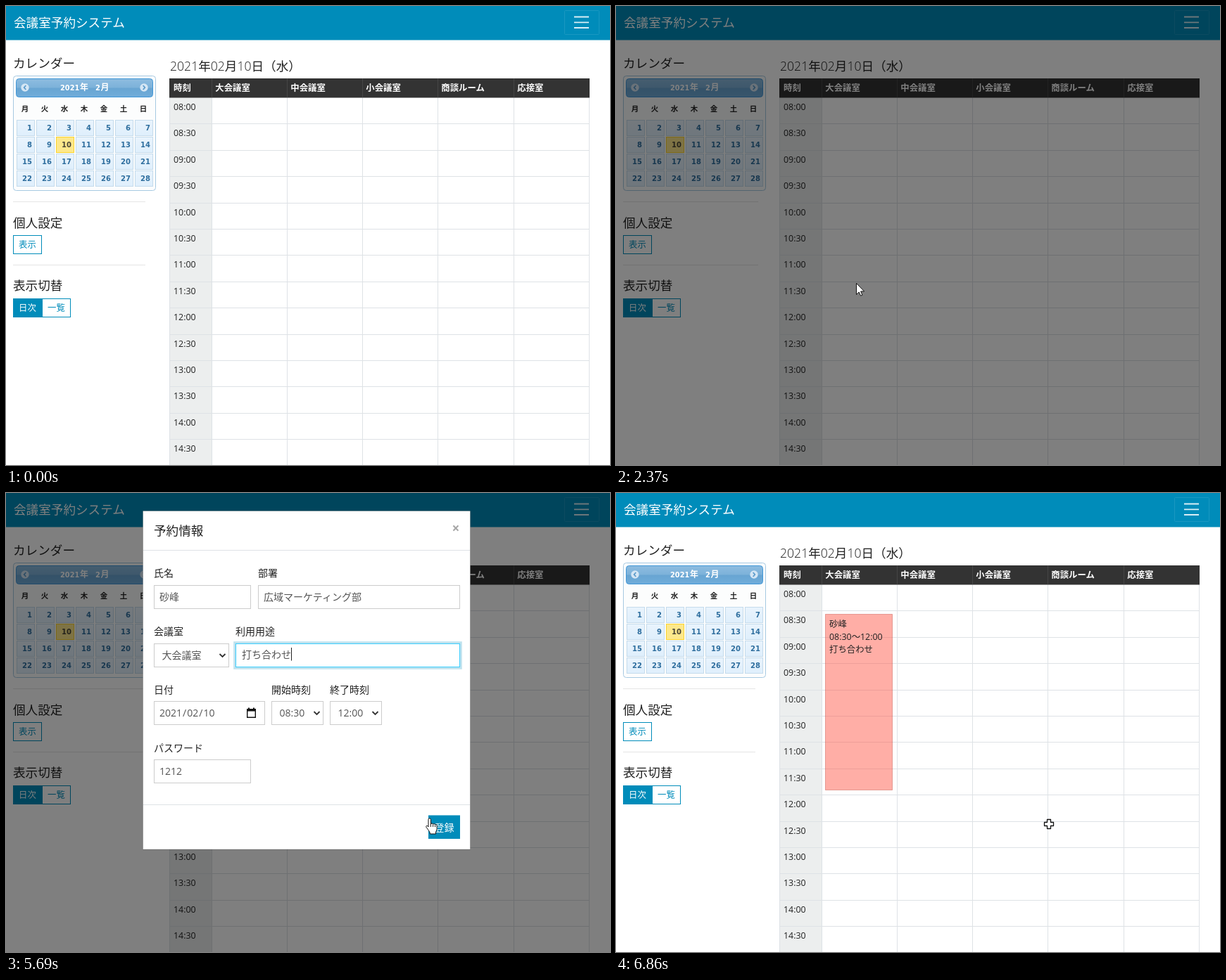
Animation, 858 px wide and 653 px high, one loop 7640 ms. Source, as an HTML page:

```html
<!DOCTYPE html>
<html lang="ja">
<head>
<meta charset="utf-8">
<title>会議室予約システム</title>
<style>
html, body { margin: 0; width: 100%; height: 100%; overflow: hidden; background: #fff; }
svg { display: block; width: 100%; height: 100%; }
text { font-family: "Open Sans", "Noto Sans CJK JP", "Noto Sans CJK", sans-serif; white-space: pre; }
.head { font-weight: 350; }
.date { font-weight: 300; }
.bold { font-weight: 700; }
.cal { font-family: "DejaVu Sans", "Noto Sans CJK JP", sans-serif; font-weight: 700; }
.mid { text-anchor: middle; }
.end { text-anchor: end; }
.ime { font-family: "Noto Sans CJK JP", "Noto Sans CJK", sans-serif; font-feature-settings: "palt"; }
</style>
</head>
<body>
<svg id="stage" viewBox="0 0 858 653" preserveAspectRatio="none"></svg>
<script>
const LOOP = 7640, BLUE = '#008cba', LINE = '#dee2e6';
const NAME = '砂峰', DEPT = '広域マーケティング部';
const $ = id => document.getElementById(id);
const clamp = v => Math.max(0, Math.min(1, v));
const range = n => [...Array(n).keys()];
const easeOut = p => 1 - (1 - p) ** 2;

// cy is the vertical middle of the glyphs
const text = (x, cy, s, size = 14, fill = '#222', cls = '', more = '') =>
  `<text x="${x}" y="${(cy + size * .37).toFixed(2)}" font-size="${size}" fill="${fill}" class="${cls}" ${more}>${s}</text>`;
const rect = (x, y, w, h, fill, more = '') =>
  `<rect x="${x}" y="${y}" width="${w}" height="${h}" fill="${fill}" ${more}/>`;
const frame = (x, y, x2, y2, stroke, fill = '#fff', more = '') =>
  rect(x + .5, y + .5, x2 - x - 1, y2 - y - 1, fill, `stroke="${stroke}" ${more}`);
const path = (d, stroke, width = 1, more = '') =>
  `<path d="${d}" fill="none" stroke="${stroke}" stroke-width="${width}" ${more}/>`;
const rowY = k => Math.round(130 + 37.4 * k);

function header() {
  return rect(0, 0, 858, 48.5, BLUE) + text(11, 23, '会議室予約システム', 17.6, '#fff')
    + frame(793, 6, 843, 41, '#1a98c1', 'none', 'rx="1"')
    + path('M807 15.5h21M807 23.300h21M807 31h21', '#d9eef5', 1.8);
}

function calendar() {
  const arrow = (x, d) => `<circle cx="${x}" cy="116" r="5.700" fill="#d5e6f4"/>`
    + path(`M${x - d} 113l${2 * d} 3l${-2 * d} 3`, '#5c9ccc', 1.8);
  const week = [...'月火水木金土日'].map((d, i) => text(27 + 28 * i, 146, d, 10.5, '#222', 'cal mid')).join('');
  const days = range(28).map(i => {
    const x = 15 + 28 * (i % 7), y = 162 + Math.round(24.1 * Math.floor(i / 7)), today = i === 9;
    return frame(x, y, x + 26, y + 23, today ? '#fad42e' : '#c5dbec', today ? '#fde88c' : 'url(#day)')
      + text(x + 22, y + 11, i + 1, 10, today ? '#4a4636' : '#2e6e9e', 'cal end');
  }).join('');
  return frame(10, 99, 213, 263, '#a6c9e2', '#fcfdfd', 'rx="4"')
    + frame(14, 103, 209, 130, '#4297d7', 'url(#bar)', 'rx="4"')
    + arrow(27, -1.3) + arrow(196, 1.3)
    + text(77, 116, '2021', 9.8, '#fff', 'cal') + text(105, 116, '年', 12, '#fff', 'cal')
    + text(127, 116, '2', 9.8, '#fff', 'cal') + text(134.5, 116, '月', 12, '#fff', 'cal') + week + days;
}

function sidebar() {
  return text(10, 81, 'カレンダー', 17.6, '#222', 'head') + calendar()
    + path('M10 278.500H198M10 368.500H198', '#e5e5e5', 1, 'id="rules"')
    + text(10, 308, '個人設定', 17.6, '#222', 'head')
    + frame(10, 326, 51, 353, BLUE) + text(18, 339.5, '表示', 12.4, BLUE)
    + text(10, 397.5, '表示切替', 17.6, '#222', 'head')
    + frame(10, 416, 51, 443, BLUE, BLUE) + text(18, 429.5, '日次', 12.4, '#fff')
    + frame(51, 416, 92, 443, BLUE) + text(59, 429.5, '一覧', 12.4, BLUE);
}

function table() {
  const cols = [232, 292, 399, 506, 613, 721, 828];
  const heads = ['時刻', '大会議室', '中会議室', '小会議室', '商談ルーム', '応接室'];
  const two = n => String(n).padStart(2, '0');
  return text(233, 85, '2021年02月10日（水）', 17.6, '#222', 'date')
    + rect(232, 130, 60, 523, '#eceeee') + rect(293, 168, 106, 0, '#ffee99', 'id="pick"')
    + path(cols.map(x => `M${x + .5} 130V653`).join('') + range(13).map(k => `M232 ${rowY(k + 1) + .5}H829`).join(''), LINE)
    + rect(232, 103, 597, 27.5, '#333')
    + path(cols.slice(1, 6).map(x => `M${x + .5} 103V130`).join(''), '#454545')
    + heads.map((s, i) => text(cols[i] + (i ? 5.3 : 6), 116, s, 12.4, '#fff', 'bold')).join('')
    + range(14).map(k => text(238, 143.5 + 37.4 * k, `${two(8 + (k >> 1))}:${k % 2 ? '30' : '00'}`, 12.4)).join('')
    + '<g id="booking">' + frame(297, 172, 393, 423, 'rgba(190,60,50,.4)', 'rgba(255,94,78,.5)')
    + text(303, 186.5, NAME, 12.4) + text(303, 204, '08:30～12:00', 12.4) + text(303, 222, '打ち合わせ', 12.4) + '</g>';
}

function modal() {
  const box = (x, y, x2, s, pad = 8, more = '') =>
    frame(x, y, x2, y + 34, '#ccc') + text(x + pad, y + 17, s, 14, '#555', '', more);
  const select = (x, y, x2, s) => box(x, y, x2, s, 11.5) + path(`M${x2 - 13.5} ${y + 15}l4 4l4-4`, '#333', 1.8);
  const labels = [[210, 114, '氏名'], [358, 114, '部署'], [210, 197, '会議室'], [326, 197, '利用用途'],
    [210, 280, '日付'], [377, 280, '開始時刻'], [460, 280, '終了時刻'], [210, 363, 'パスワード']];
  return frame(194, 25, 660, 507.5, 'rgba(0,0,0,.2)')
    + path('M195 81.500H659M195 443.500H659', LINE)
    + text(210, 53, '予約情報', 17.6, '#222', 'head') + text(639, 50, '×', 19, '#a6a6a6', 'bold mid')
    + labels.map(l => text(...l)).join('')
    + box(210, 131, 348, NAME) + box(358, 131, 645, DEPT) + select(210, 214, 317, '大会議室')
    + rect(324.6, 212.6, 321.8, 36.8, 'none', 'id="ring" stroke="rgba(0,140,186,.25)" stroke-width="2.800"')
    + frame(326, 214, 645, 248, '#ccc', '#fff', 'id="field"')
    + text(335, 230, '', 14, '#555', '', 'id="entry"')
    + path('M405.500 220V238.500', '#222', 1, 'id="caret"') + '<g id="mark"></g>'
    + box(210, 296, 368, '2021/02/10', 8, 'dx="0 0 0 0 1 1 0 1 1"')
    + path('M342.700 308.500h11.600v10.800h-11.600z', '#111', 1.4) + rect(342, 307, 13, 3.5, '#111')
    + rect(344, 305.5, 2, 2, '#111') + rect(351, 305.5, 2, 2, '#111')
    + select(377, 296, 451, '08:30') + select(460, 296, 534, '12:00') + box(210, 379, 348, '1212')
    + rect(598.2, 457.2, 48.6, 36.6, 'none', 'id="glow" stroke="rgba(0,140,186,.5)" stroke-width="3.500"')
    + rect(600, 458.5, 45, 33.5, BLUE, 'id="submit"') + text(622.5, 476, '登録', 14, '#fff', 'mid');
}

function pointers() {
  const shape = (id, d, more = '') => `<path id="${id}" d="${d}" fill="#fff" stroke="#111" stroke-linejoin="round" ${more}/>`;
  return '<g id="pointer"><circle id="halo" r="11" fill="#f8ec22" opacity=".92"/>'
    + shape('cross', 'M-2.500-6.500h5v4h4v5h-4v4h-5v-4h-4v-5h4z', 'stroke-width="1.300"')
    + shape('arrow', 'M.5.5V16.500L4.200 13 6.600 18.200 8.900 17.200 6.600 12h5z')
    + shape('beam', 'M-3-7.500h2.200l.8.800.8-.8H3M0-7V7M-3 7.500h2.200L0 6.700l.8.800H3', 'style="fill:none"')
    + shape('hand', 'M4 2.500a1.700 1.700 0 0 1 3.400 0V9c.3-1.400 3-1.300 3.200.3.5-1.100 2.700-.9 2.900.6.5-.9 2.600-.6 2.600 1.200V16c0 2-1.600 3-1.600 5v2H6.300v-1.500C5.500 19 2.300 15.500.9 13.200.2 11.800 2 10.600 3 11.800L4 13zM7.400 9v4M10.600 9.500v3.500M13.500 10.500v2.500', 'transform="translate(-6 -1)"')
    + '</g>';
}

const fade = (id, stops) => `<linearGradient id="${id}" x2="0" y2="1">`
  + stops.map(([o, c]) => `<stop offset="${o}" stop-color="${c}"/>`).join('') + '</linearGradient>';

$('stage').innerHTML = '<defs>' + fade('bar', [[0, '#8dbce0'], [.48, '#7db2da'], [.52, '#68a5d2'], [1, '#70acda']])
  + fade('day', [[0, '#e9f4fd'], [.5, '#e4f1fc'], [1, '#dfeffc']]) + '</defs>'
  + rect(0, 0, 858, 653, '#fff') + header() + sidebar() + table()
  + rect(0, 0, 858, 653, '#000', 'id="shade"')
  + `<g id="modal">${modal()}</g><g id="popup"></g>` + pointers();

// screen updates: first time, last time, count
const runs = [[0, 0, 1], [220, 580, 6], [750, 1040, 5], [1210, 1580, 6], [1660, 1890, 4], [2190, 2370, 3],
  [2430, 2830, 6], [3160, 3220, 2], [3370, 3520, 3], [3690, 4080, 6], [4220, 4300, 2], [4530, 4530, 1],
  [5000, 5000, 1], [5140, 5690, 8], [5770, 5840, 2], [6010, 6010, 1], [6160, 6330, 3], [6480, 6710, 4], [6800, 6860, 2]];
const last = (list, t) => list.filter(r => t >= r[0]).pop();
function snap(t) {
  const [a, b, n] = last(runs, t), d = (b - a) / (n - 1) || 1;
  return a + d * Math.min(n - 1, Math.floor((t - a) / d + 1e-6));
}

const route = [[220, 664, 561], [364, 470, 370], [508, 349, 256], [580, 354, 252], [750, 354, 252], [1040, 357, 201],
  [1210, 357, 201], [1580, 339, 359], [1890, 341, 394], [3080, 341, 394], [3160, 343, 396], [5060, 343, 396],
  [5690, 602, 463], [5840, 613, 470], [6080, 613, 470], [6160, 615, 471], [LOOP, 615, 471]];
function place(t) {
  const i = Math.max(1, route.findIndex(k => k[0] >= t)), [a, x, y] = route[i - 1], [b, u, v] = route[i];
  const p = clamp((t - a) / (b - a));
  return [x + (u - x) * p, y + (v - y) * p];
}

const guesses = [
  ['打ち合わせ', 'うれしい', 'ウェブ', '売上', '打ち合わせを'],
  ['打ち合わせ', 'うち', '内', '打合せ', '打ち合わせのため'],
  ['打ち合わせ', '打合せ', '打ち合わせを', '打ち上げ', '打ち合わせの件'],
  ['打ち合わせ', '打合せ', '打ち合わせ結果', '打ち合わせを', '打ち合わせのため']];
const typing = [[0, ''], [3160, 'う'], [3220, 'う', 0], [3370, 'うｔ', 0], [3445, 'うち', 0], [3520, 'うち', 1],
  [3690, 'うちあ', 1], [3768, 'うちあ', 2], [3846, 'うちあｗ', 2], [3924, 'うちあわ', 2], [4002, 'うちあわ', 3],
  [4080, 'うちあわｓ', 3], [4220, 'うちあわせ', 3], [4300, '打ち合わせ']];
const popup = list => list === undefined ? ''
  : frame(304, 239, list ? 487.5 : 479.5, 391, '#c6c6c6')
    + guesses[list].map((s, i) => text(337, 254.5 + 30 * i, s, 13.6, '#000', 'ime')).join('');

function underline(t, width) {
  if (t < 3160 || t >= 4530 || !width) return '';
  if (t >= 4300) return rect(335, 236, width - 1, 2, '#444');
  return path(`M335 236.500h${width}`, '#333', 1, 'stroke-dasharray="2 2"')
    + path(`M337 237.500h${width - 2}`, '#333', 1, 'stroke-dasharray="2 2"');
}

const show = (id, on) => { $(id).style.display = on ? '' : 'none'; };

function draw(t) {
  const open = t >= 2190 && t < 6860, closing = t >= 6400;
  $('rules').setAttribute('d', `M10 278.500H${open ? 202 : 198}M10 368.500H${open ? 202 : 198}`);

  const [x, y] = place(t), dragging = t >= 1210 && t < 2190;
  const end = rowY(Math.floor((y - 130) / 37.4) + 1);
  $('pick').setAttribute('height', dragging ? end - 168 : 0);
  show('booking', t >= 6550);

  const dim = closing ? (6842 - t) / 150 : (t - 2160) / 150;
  $('shade').setAttribute('opacity', .5 * clamp(dim));
  const alpha = clamp(closing ? (6590 - t) / 150 : (t - 2400) / 150);
  const slide = closing ? easeOut(clamp((t - 6440) / 300)) : 1 - easeOut(clamp((t - 2400) / 300));
  $('modal').setAttribute('opacity', alpha);
  $('modal').setAttribute('transform', `translate(0 ${-44 * slide})`);
  show('modal', alpha > 0);

  const [, word, list] = last(typing, t + .5), width = 14 * word.length;
  const focus = t >= 2740 && t < 6240;
  $('entry').textContent = word;
  $('mark').innerHTML = underline(t, width);
  $('popup').innerHTML = popup(list);
  $('field').setAttribute('stroke', focus ? '#3bceff' : '#ccc');
  show('ring', focus);
  $('caret').setAttribute('transform', `translate(${width - 70} 0)`);
  show('caret', focus && !(t >= 5000 && t < 5450) && t < 6010);
  $('submit').setAttribute('fill', t >= 5760 ? '#006f94' : BLUE);
  show('glow', t >= 6240);

  const pressed = dragging || (t >= 6240 && t < 6330);
  let kind = 'cross';
  if (open) kind = t < 3160 ? 'arrow' : x < 348 ? 'beam' : x >= 600 && t < 6600 ? 'hand' : 'arrow';
  for (const id of ['cross', 'arrow', 'beam', 'hand']) show(id, id === kind);
  show('halo', pressed);
  $('cross').setAttribute('fill', pressed ? '#fbf47a' : '#fff');
  $('pointer').setAttribute('transform', `translate(${x} ${y})`);
  show('pointer', t >= 220);
}

const start = performance.now();
let shown = -1;
function tick() {
  const t = snap((performance.now() - start) % LOOP);
  if (t !== shown) draw(shown = t);
  requestAnimationFrame(tick);
}
tick();
</script>
</body>
</html>
```
